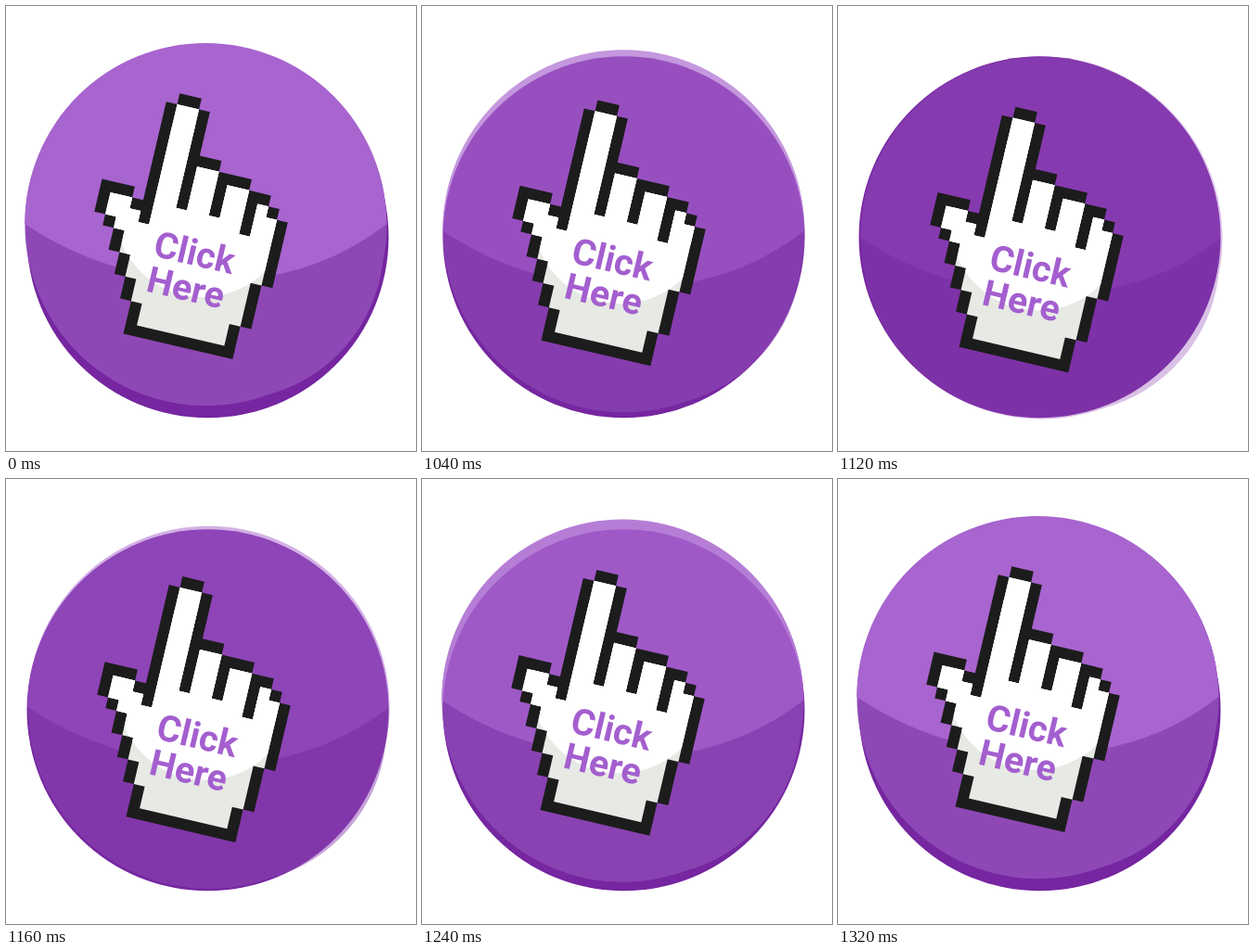
An HTML page that plays this animation: 442 px wide and 480 px high, repeating every 3 s.

```html
<!DOCTYPE html>
<html lang="en">
<head>
<meta charset="utf-8">
<title>Click Here button</title>
<style>
  html, body { margin: 0; width: 100%; height: 100%; overflow: hidden; background: #fff; }
  svg { display: block; width: 100%; height: 100%; }
  text { font: 700 39.3px Roboto, Arial, sans-serif; fill: #a45fcf; }
</style>
</head>
<body>
<svg viewBox="0 0 442 480">
  <defs>
    <clipPath id="palm">
      <path transform="translate(187.3 94.3) rotate(13.2) scale(12.1)"
        d="M0 1h2v9h1V6h2v4h1V7h2v4h1V8h1v1h1v6h-1v4h-1v2H1v-2h-1v-2h-1v-2h-1v-2h-1v-1h-1v-2h2v1h1v1h1z"/>
    </clipPath>
  </defs>

  <circle cx="217.5" cy="249.3" r="195" fill="#7526a0"/>

  <g id="top">
    <g id="face">
      <!-- disc with a slight bulge at the lower right -->
      <path d="M406.2 276.8A169 169 0 0 1 282 419.5A195 195 0 1 1 406.2 276.8" fill="#8e48b5"/>
      <path d="M20.2 235A195 195 0 0 1 410.2 235A284 284 0 0 1 215.4 295A348 348 0 0 1 20.2 235" fill="#a864cf"/>
    </g>

    <path transform="translate(187.3 94.3) rotate(13.2) scale(12.1)" fill="#1c1c1c"
      d="M0 0h2v1h1v4h2v1h3v1h2v1h1v1h1v6h-1v4h-1v3h-10v-3h-1v-2h-1v-2h-1v-2h-1v-1h-1v-3h3v1h1V1h1z"/>
    <g clip-path="url(#palm)">
      <rect x="90" y="90" width="220" height="300" fill="#e6e9e4"/>
      <circle cx="212" cy="219" r="95" fill="#fff"/>
      <rect x="90" y="90" width="220" height="160" fill="#fff"/>
    </g>
    <text transform="translate(157.5 269.3) rotate(13.2)">Click</text>
    <text transform="translate(149.8 307.3) rotate(13.2)">Here</text>
  </g>
</svg>
<script>
  const LOOP = 3000, PRESS = 1000, STEP = 40, DEPTH = 4;
  const [topLayer, face] = ['top', 'face'].map(id => document.getElementById(id));
  const start = performance.now();

  // Pressed depth: 0 at rest, up to DEPTH and back in equal steps.
  function depthAt(t) {
    const n = Math.floor((t - PRESS) / STEP) + 1;
    return Math.max(0, DEPTH - Math.abs(DEPTH - n));
  }

  function draw(now) {
    const d = depthAt(Math.max(0, now - start) % LOOP);
    topLayer.setAttribute('transform', `translate(${d} ${d * 3.6})`);
    face.setAttribute('opacity', 1 - d / 6);
    requestAnimationFrame(draw);
  }
  requestAnimationFrame(draw);
</script>
</body>
</html>
```
